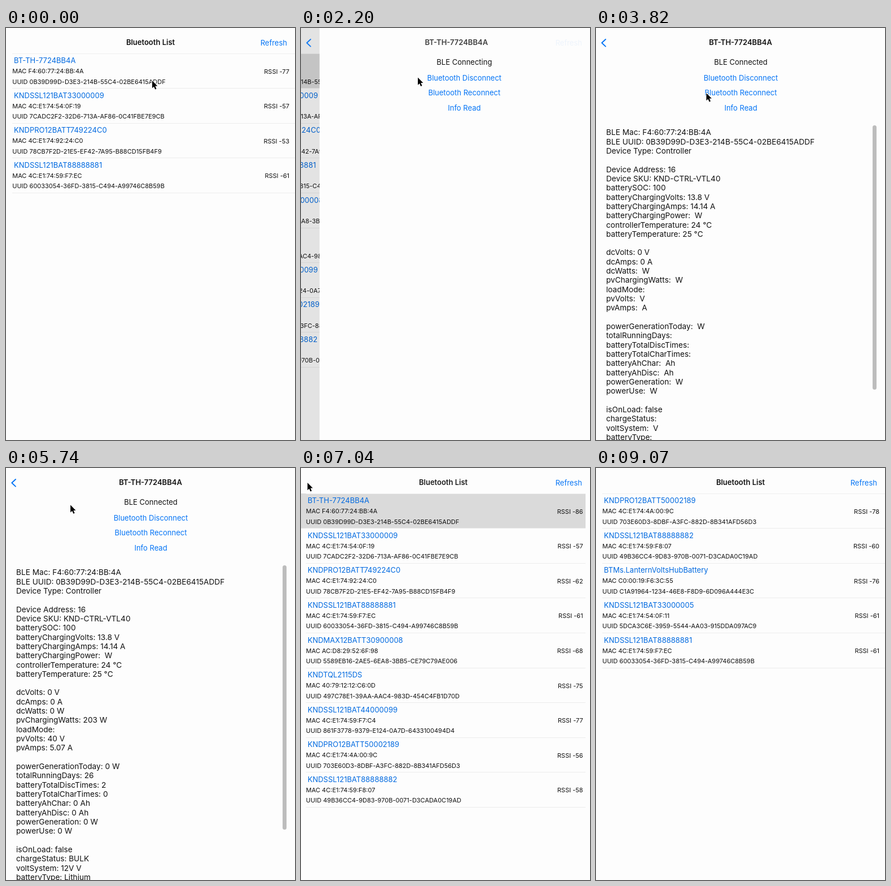
Write an HTML page with a canvas that moves like this. It is 512x728 px and loops after 9.31 s.

```html
<!DOCTYPE html>
<html lang="en">
<head>
<meta charset="utf-8">
<title>Bluetooth List</title>
<style>
  html, body { margin: 0; width: 100%; height: 100%; overflow: hidden; background: #fdfdfd; }
  canvas { display: block; }
</style>
</head>
<body>
<canvas id="stage" width="512" height="728"></canvas>
<script>
const W = 512, H = 728, LOOP = 9310;
const PUSH = 2016, POP = 6785, RESCAN = 7350;
const NAV = 45, ROW = 61.6, LINE = 16.32;
const SMALL = 11, MEDIUM = 13, LARGE = 13.65;
const PAPER = '#fdfdfd', INK = '#111', BLUE = '#0474f5', NAME_BLUE = '#006ae0';
const ctx = document.getElementById('stage').getContext('2d');

// [name, MAC, UUID, appears at, [RSSI, [time, RSSI], ...]]
const firstScan = [
  ['BT-TH-7724BB4A', 'F4:60:77:24:BB:4A', '0B39D99D-D3E3-214B-55C4-02BE6415ADDF', 0, [-77, [1490, -83], [1850, -86]]],
  ['KNDSSL121BAT33000009', '4C:E1:74:54:0F:19', '7CADC2F2-32D6-713A-AF86-0C41FBE7E9CB', 0, [-57]],
  ['KNDPRO12BATT749224C0', '4C:E1:74:92:24:C0', '78CB7F2D-21E5-EF42-7A95-B88CD15FB4F9', 0, [-53, [1490, -62]]],
  ['KNDSSL121BAT88888881', '4C:E1:74:59:F7:EC', '60033054-36FD-3815-C494-A99746C8B59B', 0, [-61]],
  ['KNDMAX12BATT30900008', 'AC:D8:29:52:6F:98', '5589EB16-2AE5-6EA8-3BB5-CE79C79AE006', 200, [-68]],
  ['KNDTQL2115DS', '40:79:12:12:C6:0D', '497C78E1-39AA-AAC4-983D-454C4FB1D70D', 380, [-74, [970, -75]]],
  ['KNDSSL121BAT44000099', '4C:E1:74:59:F7:C4', '861F3778-9379-E124-0A7D-6433100494D4', 610, [-77]],
  ['KNDPRO12BATT50002189', '4C:E1:74:4A:00:9C', '703E60D3-8DBF-A3FC-882D-8B341AFD56D3', 1260, [-56]],
  ['KNDSSL121BAT88888882', '4C:E1:74:59:F8:07', '49B36CC4-9D83-970B-0071-D3CADA0C19AD', 1490, [-58]]
];
const secondScan = [
  [...firstScan[7].slice(0, 3), 7420, [-78]],
  [...firstScan[8].slice(0, 3), 7540, [-60]],
  ['BTMs.LanternVoltsHubBattery', 'C0:00:19:F6:3C:55', 'C1A91964-1234-46E8-F8D9-6D096A444E3C', 8540, [-76]],
  ['KNDSSL121BAT33000005', '4C:E1:74:54:0F:11', '5DCA3C6E-3959-5544-AA03-915DDA097AC9', 8720, [-61]],
  [...firstScan[3].slice(0, 3), 9070, [-61]]
];

// [label, value, unit, value known from]; null is an empty line
const readings = [
  ['BLE Mac', firstScan[0][1], '', 0],
  ['BLE UUID', firstScan[0][2], '', 0],
  ['Device Type', 'Controller', '', 2990],
  null,
  ['Device Address', '16', '', 3060],
  ['Device SKU', 'KND-CTRL-VTL40', '', 3130],
  ['batterySOC', '100', '', 3200],
  ['batteryChargingVolts', '13.8', ' V', 3280],
  ['batteryChargingAmps', '14.14', ' A', 3360],
  ['batteryChargingPower', '', ' W', 0],
  ['controllerTemperature', '24', ' °C', 3450],
  ['batteryTemperature', '25', ' °C', 3540],
  null,
  ['dcVolts', '0', ' V', 3650],
  ['dcAmps', '0', ' A', 3760],
  ['dcWatts', '0', ' W', 3880],
  ['pvChargingWatts', '203', ' W', 3960],
  ['loadMode', '', '', 0],
  ['pvVolts', '40', ' V', 4050],
  ['pvAmps', '5.07', ' A', 4140],
  null,
  ['powerGenerationToday', '0', ' W', 4290],
  ['totalRunningDays', '26', '', 4420],
  ['batteryTotalDiscTimes', '2', '', 4550],
  ['batteryTotalCharTimes', '0', '', 4680],
  ['batteryAhChar', '0', ' Ah', 4810],
  ['batteryAhDisc', '0', ' Ah', 4940],
  ['powerGeneration', '0', ' W', 5070],
  ['powerUse', '0', ' W', 5210],
  null,
  ['isOnLoad', 'false', '', 0],
  ['chargeStatus', 'BULK', '', 5390],
  ['voltSystem', '12V', ' V', 5620],
  ['batteryType', 'Lithium', '', 5700]
];

// Pointer tip: [time, x, y]
const pointerPath = [
  [0, 259, 93], [90, 259, 93], [380, 214, 80], [1200, 214, 80], [1320, 207, 87.5],
  [2860, 207, 87.5], [3400, 196, 115], [3820, 195.5, 115], [4140, 194, 116], [4290, 193, 116],
  [5600, 192, 116], [5740, 114.5, 65.5], [5960, 45, 36], [6380, 11, 24], [6680, 11, 24],
  [6780, 11.5, 26], [7120, 11.5, 26], [7350, 190, 95], [7590, 345, 124], [7650, 349, 123],
  [7950, 435, 80], [8240, 472, 59], [8480, 472, 60], [8890, 480, 740]
];

const clamp = v => Math.max(0, Math.min(1, v));

// Critically damped spring, 0 to 1
function spring(ms) {
  const x = Math.max(0, ms) * 0.024;
  return 1 - (1 + x) * Math.exp(-x);
}

function text(str, x, y, size, color, align = 'left', weight = 400) {
  ctx.font = `${weight} ${size}px Inter, sans-serif`;
  ctx.fillStyle = color;
  ctx.textAlign = align;
  ctx.fillText(str, x, y);
}

function faded(alpha, draw) {
  ctx.save();
  ctx.globalAlpha = clamp(alpha);
  draw();
  ctx.restore();
}

function rect(x, y, w, h, color) {
  ctx.fillStyle = color;
  ctx.fillRect(x, y, w, h);
}

function drawList(t, shift) {
  const rows = (t < RESCAN ? firstScan : secondScan).filter(row => t >= row[3]);
  ctx.save();
  ctx.translate(shift, 0);
  if (t >= PUSH && t < RESCAN) {
    faded((RESCAN - t) / 220, () => rect(0, NAV, W, ROW, '#dadada'));
  }
  rect(11, NAV, W, 1, '#efefef');
  rows.forEach(([name, mac, uuid, , [initial, ...updates]], i) => {
    const y = NAV + i * ROW;
    const rssi = updates.reduce((value, [at, next]) => t >= at ? next : value, initial);
    text(name, 14, y + 17.2, MEDIUM, NAME_BLUE);
    text('MAC ' + mac, 11.2, y + 35.2, SMALL, INK);
    text('UUID ' + uuid, 11.2, y + 53.6, SMALL, INK);
    text('RSSI ' + rssi, 502, y + 35.5, SMALL, INK, 'right');
    rect(11, Math.round(y + ROW - 0.5), W, 1, '#ececec');
  });
  ctx.restore();
}

function drawDetail(t, x) {
  ctx.save();
  ctx.translate(x, 0);
  rect(0, 0, W, H, PAPER);
  text(t < 2860 ? 'BLE Connecting' : 'BLE Connected', 256.5, 65, MEDIUM, INK, 'center');
  ['Bluetooth Disconnect', 'Bluetooth Reconnect', 'Info Read'].forEach((label, i) =>
    text(label, 256.5, 92.6 + i * 26.6, MEDIUM, BLUE, 'center'));
  if (t >= 2920) {
    readings.forEach((line, i) => {
      if (!line) return;
      const [label, value, unit, from] = line;
      text(`${label}: ${t >= from ? value : ''}${unit}`, 18, 189.3 + i * LINE, LARGE, INK);
    });
    ctx.fillStyle = '#bdbdbd';
    ctx.beginPath();
    ctx.roundRect(490, 172, 7, 467, 3.5);
    ctx.fill();
  }
  ctx.restore();
}

function drawNav(pushed) {
  const left = 1 - pushed;
  faded(1 - 3 * pushed, () =>
    text('Bluetooth List', 256 - 256 * pushed, 30.3, MEDIUM, INK, 'center', 600));
  faded(left, () => text('Refresh', 498, 30.5, MEDIUM, BLUE, 'right'));
  faded(1 - 3 * left, () =>
    text('BT-TH-7724BB4A', 256 + 300 * left, 30.3, MEDIUM, INK, 'center', 600));
  faded(pushed, () => {
    ctx.strokeStyle = BLUE;
    ctx.lineWidth = 1.9;
    ctx.lineCap = ctx.lineJoin = 'round';
    ctx.stroke(new Path2D('M17 20 L10.3 26.3 L17 32.6'));
  });
}

const arrow = new Path2D('M0 0 V13.2 L3 10.4 L5.2 15.5 L7.5 14.5 L5.3 9.6 H9.4 Z');
function drawPointer(t) {
  const i = pointerPath.findIndex(point => point[0] > t);
  if (i < 0) return;
  const [t0, x0, y0] = pointerPath[i - 1], [t1, x1, y1] = pointerPath[i];
  const k = (t - t0) / (t1 - t0);
  ctx.save();
  ctx.translate(x0 + (x1 - x0) * k, y0 + (y1 - y0) * k);
  ctx.lineJoin = 'round';
  ctx.lineWidth = 2;
  ctx.strokeStyle = '#fff';
  ctx.stroke(arrow);
  ctx.fillStyle = '#000';
  ctx.fill(arrow);
  ctx.restore();
}

function frame() {
  const t = performance.now() % LOOP;
  const pushed = spring(t - PUSH) - spring(t - POP);
  rect(0, 0, W, H, PAPER);
  drawList(t, -0.3 * W * pushed);
  if (pushed > 0.0005) {
    rect(0, 0, W, H, `rgba(0,0,0,${0.11 * pushed})`);
    drawDetail(t, W * (1 - pushed));
  }
  drawNav(pushed);
  drawPointer(t);
  requestAnimationFrame(frame);
}
frame();
</script>
</body>
</html>
```
